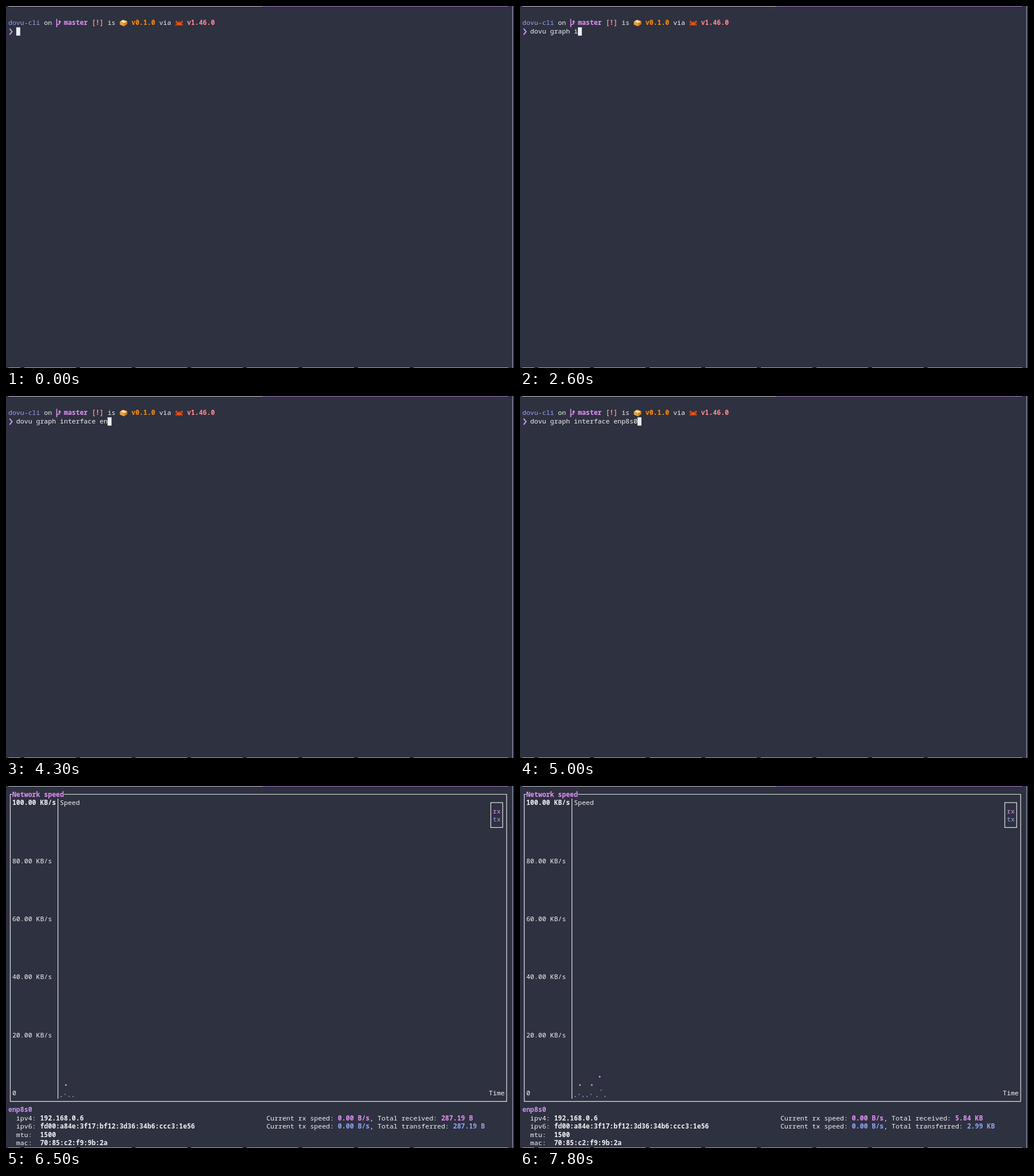
Write an HTML page with a canvas that moves like this. It is 886x632 px and loops after 8 s.

```html
<!DOCTYPE html>
<html lang="en">
<head>
<meta charset="utf-8">
<title>Terminal network graph</title>
<style>
  html, body { margin: 0; width: 100%; height: 100%; overflow: hidden; background: #2e313f; }
  canvas { display: block; width: 886px; height: 632px; }
</style>
</head>
<body>
<canvas id="stage" width="886" height="632"></canvas>
<script>
const ctx = document.getElementById('stage').getContext('2d');
const LOOP = 8000, GRAPH_START = 5600, SAMPLE_STEP = 300;
const CELL_W = 6.926, CELL_H = 14.486;
const BG = '#2e313f', WHITE = '#f2f2f5', LINE = '#e4e5ea', BLUE = '#93a4f5',
      PINK = '#e391f8', PURPLE = '#c792f5', RED = '#ff8b92', ORANGE = '#ff8c0a';

// Each word is typed evenly between two times; a space follows after a pause.
const WORDS = [
  { text: 'dovu', from: 400, to: 800 },
  { text: 'graph', from: 1500, to: 2100 },
  { text: 'interface', from: 2600, to: 3800 },
  { text: 'enp8s0', from: 4100, to: 5000 }
];
const SPACE_PAUSE = 200;

// Bytes moved; every other sample is idle.
const BURSTS = [
  { at: 1, rx: 287.19, tx: 287.19 },
  { at: 4, rx: 588.41, tx: 643.2 },
  { at: 6, rx: 4964.4, tx: 2059.61 }
];

const colX = col => 4 + col * CELL_W;
const midX = col => colX(col + 0.5);
const midY = row => 14.5 + row * CELL_H;

function rect(x, y, w, h, color) {
  ctx.fillStyle = color;
  ctx.fillRect(x, y, w, h);
}

function ellipse(x, y, rx, ry, color) {
  ctx.fillStyle = color;
  ctx.beginPath();
  ctx.ellipse(x, y, rx, ry, 0, 0, Math.PI * 2);
  ctx.fill();
}

const disc = (x, y, r, color) => ellipse(x, y, r, r, color);

function trace(points) {
  ctx.beginPath();
  points.forEach(([x, y]) => ctx.lineTo(x, y));
}

function stroke(color, width, ...points) {
  ctx.strokeStyle = color;
  ctx.lineWidth = width;
  trace(points);
  ctx.stroke();
}

function polygon(color, ...points) {
  ctx.fillStyle = color;
  trace(points);
  ctx.fill();
}

// Writes on the character grid and returns the next free column.
function write(col, row, text, color = WHITE, bold = false) {
  ctx.font = `${bold ? 'bold ' : ''}11.543px "Noto Sans Mono", "DejaVu Sans Mono", monospace`;
  ctx.fillStyle = color;
  for (const ch of text) ctx.fillText(ch, colX(col++), midY(row) + 4.3);
  return col;
}

function drawWindowEdges() {
  rect(4, 0, 443, 1, '#c9cad3');
  rect(447, 0, 429, 1, '#a67cc9');
  rect(883, 0, 1, 632, '#9c9fc0');
  rect(4, 631, 872, 1, '#a5a6b0');
  for (let x = 25; x < 720; x += 97) rect(x, 631, 7, 1, '#16171f');
}

function drawBranch() {
  stroke(PINK, 1.6, [88.5, 22.5], [88.5, 37]);
  stroke(PINK, 1.5, [88.5, 33], [93.5, 31], [93.5, 27]);
  polygon(PINK, [91, 28.5], [93.5, 24.5], [96.2, 28.5]);
}

function drawPackage() {
  const left = [198.5, 27.5], back = [204, 24], right = [211.5, 26.5], front = [206, 30.5];
  const down = ([x, y]) => [x, y + 5];
  polygon('#f7c877', left, back, right, front);
  polygon('#e9a23b', left, front, down(front), down(left));
  polygon('#d3821f', front, right, down(right), down(front));
  stroke('#fff0cb', 1.4, [201.5, 25.8], [208.8, 28.6]);
}

function drawCrab() {
  const color = '#e8500f';
  ellipse(302, 31, 4.2, 2.9, color);
  for (const side of [-1, 1]) {
    disc(302 + side * 4.8, 27, 1.5, color);
    disc(302 + side * 1.4, 27.6, 0.7, color);
    stroke(color, 1.1, [302 + side * 3, 30], [302 + side * 6, 28]);
    for (let leg = 0; leg < 3; leg++) {
      stroke(color, 0.8, [302 + side * 3, 31 + leg], [302 + side * 6.4, 31.5 + leg * 1.4]);
    }
  }
}

function typedText(time) {
  const reached = key => Math.round(key / 100) * 100 <= time;
  let typed = '';
  for (const { text, from, to } of WORDS) {
    const step = (to - from) / (text.length - 1);
    typed += [...text].filter((_, i) => reached(from + i * step)).join('');
    if (reached(to + SPACE_PAUSE) && text !== WORDS.at(-1).text) typed += ' ';
  }
  return typed;
}

function drawPrompt(time) {
  write(0, 1, 'dovu-cli', BLUE);
  write(9, 1, 'on');
  drawBranch();
  write(14, 1, 'master', PINK, true);
  write(21, 1, '[!]', RED, true);
  write(25, 1, 'is');
  drawPackage();
  write(31, 1, 'v0.1.0', ORANGE, true);
  write(38, 1, 'via');
  drawCrab();
  write(45, 1, 'v1.46.0', RED, true);

  stroke(PURPLE, 2, [6.3, 39.5], [10.6, 44.7], [6.3, 50]);
  const end = write(2, 2, typedText(time));
  rect(colX(end), 37.2, CELL_W, CELL_H, '#eeeef2');
}

function drawFrame() {
  const left = midX(0), right = midX(125), top = midY(0), bottom = midY(37) + 0.2;
  stroke(LINE, 1.2, [colX(14), top], [right, top], [right, bottom],
    [left, bottom], [left, top], [colX(1), top]);
  stroke(LINE, 1.2, [midX(12), 22], [midX(12), 546]);
  ctx.strokeRect(midX(121), midY(1), 3 * CELL_W, 3 * CELL_H);

  write(1, 0, 'Network speed', PINK, true);
  write(13, 1, 'Speed');
  write(122, 2, 'rx', PINK);
  write(122, 3, 'tx', BLUE);
  write(121, 36, 'Time');
  write(1, 1, '100.00 KB/s', WHITE, true);
  for (let i = 1; i < 5; i++) write(1, 1 + 7 * i, `${100 - 20 * i}.00 KB/s`);
  write(1, 36, '0');
}

const burstAt = i => BURSTS.find(burst => burst.at === i) ?? { rx: 0, tx: 0 };

// rx marks fill whole cells, tx marks sit on a grid of 2 by 4 dots per cell.
function drawSamples(count) {
  for (let i = 0; i < count; i++) {
    const { rx, tx } = burstAt(i);
    if (rx) {
      const row = 1 + Math.floor((1 - rx / 1e5) * 35);
      disc(midX(13 + i), midY(row) + 0.4, 1.5, PINK);
    }
    const level = 143 - Math.floor((1 - tx / 1e5) * 143);
    const x = colX(13) + 2.3 + Math.floor(i * 2.2) * CELL_W / 2;
    disc(x, 542 - level * CELL_H / 4, 0.95, BLUE);
  }
}

const formatBytes = n => n < 1000 ? `${n.toFixed(2)} B` : `${(n / 1000).toFixed(2)} KB`;

function drawCounter(row, name, verb, count, color) {
  const total = BURSTS.filter(burst => burst.at < count)
    .reduce((sum, burst) => sum + burst[name], 0);
  let col = write(65, row, `Current ${name} speed: `);
  col = write(col, row, `${formatBytes(burstAt(count - 1)[name])}/s`, color, true);
  col = write(col, row, `, Total ${verb}: `);
  write(col, row, formatBytes(total), color, true);
}

function drawDetails(count) {
  write(0, 38, 'enp8s0', PURPLE, true);
  const details = {
    ipv4: '192.168.0.6',
    ipv6: 'fd00:a84e:3f17:bf12:3d36:34b6:ccc3:1e56',
    mtu: '1500',
    mac: '70:85:c2:f9:9b:2a'
  };
  Object.entries(details).forEach(([label, value], i) => {
    write(2, 39 + i, `${label}:`);
    write(8, 39 + i, value, WHITE, true);
  });
  drawCounter(39, 'rx', 'received', count, PINK);
  drawCounter(40, 'tx', 'transferred', count, BLUE);
}

function draw(now) {
  const time = now % LOOP;
  rect(0, 0, 886, 632, BG);
  drawWindowEdges();
  if (time < GRAPH_START) {
    drawPrompt(time);
  } else {
    const count = 1 + Math.floor((time - GRAPH_START) / SAMPLE_STEP);
    drawFrame();
    drawSamples(count);
    drawDetails(count);
  }
}

let start;
function tick(now) {
  start ??= now;
  draw(now - start);
  requestAnimationFrame(tick);
}
requestAnimationFrame(tick);
</script>
</body>
</html>
```
